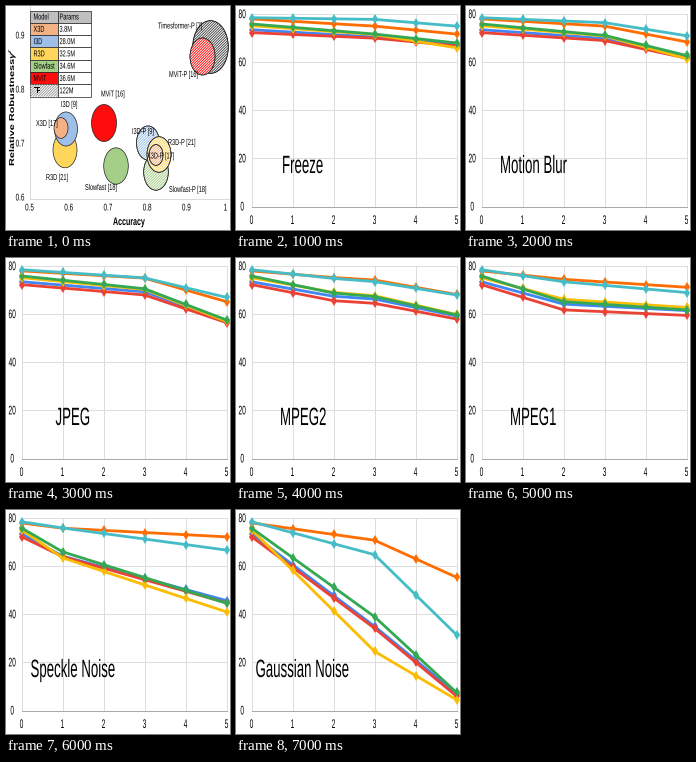
Write a matplotlib script that moves like this. It is 224 by 224 pixels and loops after 8 s.

```python
import matplotlib.pyplot as plt
import numpy as np
from matplotlib.animation import ArtistAnimation
from matplotlib.collections import LineCollection
from matplotlib.patches import Ellipse, PathPatch, Rectangle
from matplotlib.textpath import TextPath
from matplotlib.transforms import Affine2D

SIZE = 224
DPI = 64
PX = 72 / DPI            # one pixel in points
CHART_ASPECT = 0.53      # both kinds of slide are squeezed horizontally
BUBBLE_ASPECT = 0.65
INK = "#222222"

fig = plt.figure(figsize=(SIZE / DPI, SIZE / DPI), dpi=DPI, facecolor="white")
ax = fig.add_axes([0, 0, 1, 1])
ax.set_xlim(0, SIZE)
ax.set_ylim(SIZE, 0)
ax.axis("off")


def text(x, y, s, em, aspect, align="left", weight="normal", style="normal",
         angle=0):
    """Text with its baseline at y, squeezed like the rest of the slide."""
    prop = dict(family="Liberation Sans", weight=weight, style=style)
    path = TextPath((0, 0), s, size=em, prop=prop)
    if align == "center":
        box = path.get_extents()
        path = path.transformed(Affine2D().translate(-(box.x0 + box.x1) / 2, 0))
    move = Affine2D().rotate_deg(angle).scale(aspect, -1).translate(x, y)
    return ax.add_patch(PathPatch(path.transformed(move), fc="black", lw=0,
                                  zorder=1))


def line(xs, ys, color, width=1.0, **kw):
    return ax.plot(xs, ys, color=color, lw=width * PX, zorder=1, **kw)[0]


def filled(shape, fill, edge=INK):
    shape.set(fc=fill, ec=edge, lw=0.7 * PX, zorder=1)
    return ax.add_patch(shape)


def hatch(shape, x, y, rx, ry, color, gap=2.6):
    """Diagonal strokes clipped to a shape centred on (x, y)."""
    strokes = [[(x + d - ry, y + ry), (x + d + ry, y - ry)]
               for d in np.arange(-rx - ry, rx + ry, gap)]
    lines = LineCollection(strokes, colors=color, linewidths=0.9 * PX, zorder=1)
    ax.add_collection(lines, autolim=False)
    lines.set_clip_path(shape)
    return lines


# --- bubble chart -----------------------------------------------------------

# name: parameters, colour, bubble radius
MODELS = {
    "X3D": ("3.8M", "#f4b183", 7),
    "I3D": ("28.0M", "#9dbfe8", 11.5),
    "R3D": ("32.5M", "#ffd65c", 12),
    "Slowfast": ("34.6M", "#a4cf88", 12.3),
    "MViT": ("36.6M", "#ff0d0d", 12.5),
    "TF": ("122M", "white", 17.8),
}

# model, pretrained, centre, label, label position
BUBBLES = [
    ("R3D", False, (59, 144), "R3D [21]", (40, 171)),
    ("I3D", False, (60, 123), "I3D [9]", (55, 98)),
    ("X3D", False, (55, 122), "X3D [17]", (30, 117)),
    ("MViT", False, (98, 117), "MViT [16]", (95, 87.5)),
    ("Slowfast", False, (110, 160), "Slowfast [18]", (79, 181)),
    ("TF", True, (204.5, 41), "Timesformer-P [7]", (152, 19.5)),
    ("MViT", True, (196.5, 50.5), "MViT-P [16]", (163, 68)),
    ("Slowfast", True, (150, 166), "Slowfast-P [18]", (163, 183)),
    ("I3D", True, (142, 137), "I3D-P [9]", (126, 125)),
    ("R3D", True, (153, 148.5), "R3D-P [21]", (162, 136)),
    ("X3D", True, (150, 149), "X3D-P [17]", (141, 149.5)),
]


def label(x, y, s):
    return text(x, y + 3, s, 8.6, BUBBLE_ASPECT)


def bubble(name, pretrained, centre):
    _, fill, rx = MODELS[name]
    ry = 1.48 * rx
    parts = [filled(Ellipse(centre, 2 * rx, 2 * ry), fill)]
    if pretrained:
        ink = "#444444" if fill == "white" else "white"
        parts.append(hatch(parts[0], *centre, rx, ry, ink))
        parts.append(filled(Ellipse(centre, 2 * rx, 2 * ry), "none"))
    return parts


def model_table():
    left, split, right, top, height = 23.5, 51.5, 85, 4.5, 12.3
    rows = [("Model", "Params", "#bfbfbf", "#bfbfbf")]
    rows += [(name, params, fill, "white")
             for name, (params, fill, _) in MODELS.items()]
    parts = []
    for i, (name, params, fill, side) in enumerate(rows):
        y = top + i * height
        swatch = filled(Rectangle((left, y), split - left, height), fill)
        parts += [swatch,
                  filled(Rectangle((split, y), right - split, height), side)]
        if fill == "white":
            parts.append(hatch(swatch, (left + split) / 2, y + height / 2,
                               (split - left) / 2, height / 2, "#999999"))
        parts += [label(left + 4, y + 6, name), label(split + 2, y + 6, params)]
    return parts


def bubble_slide():
    parts = [line([23.5, 23.5], [0, 192.5], "#d9d9d9"),
             line([23.5, SIZE], [192.5, 192.5], "#d9d9d9")]
    for i in range(6):
        parts.append(text(23.5 + 39.2 * i, 204.5, f"{0.5 + i / 10:.2g}", 9.8,
                          BUBBLE_ASPECT, "center"))
    for i in range(4):
        parts.append(text(14, 32.5 + 54 * i, f"0.{9 - i}", 9.8,
                          BUBBLE_ASPECT, "center"))
    parts.append(text(123, 219, "Accuracy", 10.9, BUBBLE_ASPECT, "center", "bold"))
    for x, y, s, em, style in [(8, 160, "Relative Robustness", 10.9, "normal"),
                               (8, 53, "γ", 11, "italic"),
                               (5, 47, "r", 7.5, "italic")]:
        parts.append(text(x, y, s, em, BUBBLE_ASPECT, weight="bold",
                          style=style, angle=90))
    parts += model_table()
    for name, pretrained, centre, _, _ in BUBBLES:
        parts += bubble(name, pretrained, centre)
    return parts + [label(*place, s) for *_, s, place in BUBBLES]


# --- line charts ------------------------------------------------------------

COLORS = ["#4285f4", "#ea4335", "#fbbc04", "#34a853", "#ff6d01", "#46bdc6"]
CLEAN = [73.5, 72.3, 75.2, 75.9, 78.0, 78.5]
SEVERITY = np.arange(6)


def curves(knee, mid, end):
    """Accuracy falls evenly to the knee, then evenly to the last severity."""
    return np.array([np.interp(SEVERITY, [0, knee, 5], keys)
                     for keys in zip(CLEAN, mid, end)])


def chart_x(severity):
    return 15.5 + 41 * severity


def chart_y(accuracy):
    return 200.5 - 2.405 * accuracy


def chart_slide(title, x, rows):
    parts = []
    for i in SEVERITY:
        gx = chart_x(i)
        parts.append(line([gx, gx], [chart_y(80), chart_y(0)], "#dddddd"))
        parts.append(text(gx, 218, str(i), 12.5, CHART_ASPECT, "center"))
    for v in range(0, 81, 20):
        gy = chart_y(v)
        parts.append(line([chart_x(0), chart_x(5)], [gy, gy],
                          "#dddddd" if v else "#aaaaaa"))
        parts.append(text(6.2, gy + 4, str(v), 12.5, CHART_ASPECT, "center"))
    for color, row in zip(COLORS, rows):
        parts.append(line(chart_x(SEVERITY), chart_y(row), color, 2.8,
                          marker="d", ms=6.5 * PX, mew=0))
    parts.append(text(x, 167, title, 25, CHART_ASPECT))
    return parts


freeze = curves(3, [70.5, 70, 71.5, 71.7, 75, 77.8],
                [67.2, 66.8, 66, 68, 71.7, 75])
jpeg = curves(3, [69.3, 68, 70.3, 70.6, 75, 75.1],
              [57, 56.5, 57, 57.6, 65.2, 67])
mpeg = curves(2, [64.2, 61.8, 66.2, 65.2, 74.5, 73.5],
              [61.5, 59.5, 62.8, 61.8, 71.2, 69])
speckle = curves(1, [64.2, 64, 63.5, 66, 75.8, 75.9],
                 [45.7, 44.8, 41, 44.6, 72.2, 66.7])
gaussian = curves(3, [35, 34.2, 24.6, 39, 70.8, 64.8],
                  [7, 6, 4.5, 7.5, 55.4, 31.5])

slides = [
    bubble_slide(),
    chart_slide("Freeze", 46, freeze),
    chart_slide("Motion Blur", 34, (freeze + jpeg) / 2),
    chart_slide("JPEG", 49.5, jpeg),
    chart_slide("MPEG2", 44, (jpeg + mpeg) / 2),
    chart_slide("MPEG1", 44, mpeg),
    chart_slide("Speckle Noise", 24.5, speckle),
    chart_slide("Gaussian Noise", 19.5, gaussian),
]

anim = ArtistAnimation(fig, slides, interval=1000, repeat=True, repeat_delay=0)
plt.show()
```
